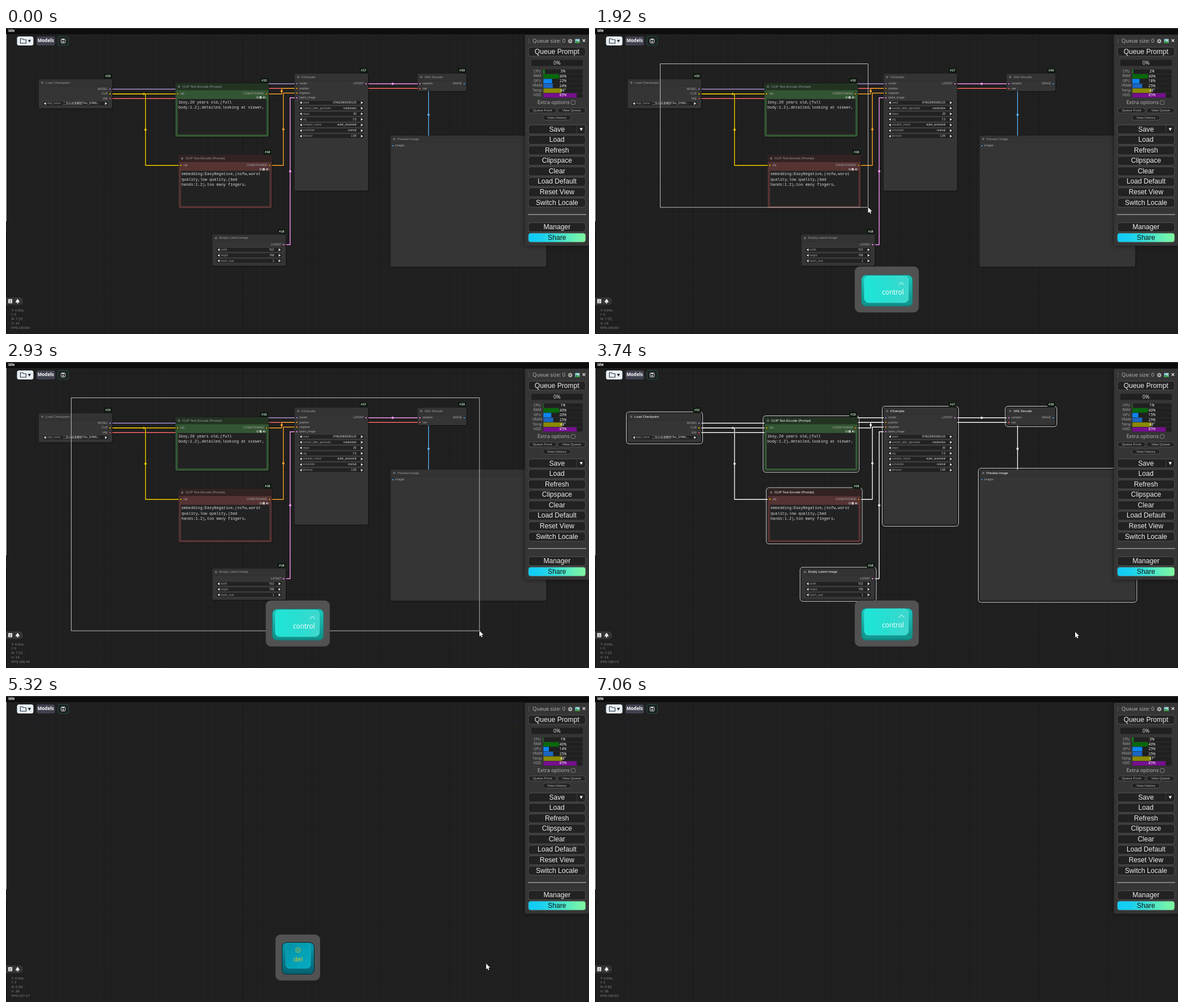
Animation, 1032 px wide and 543 px high, one loop 7.17 s. Source, as an HTML page with a canvas:

```html
<!DOCTYPE html>
<html lang="en">
<head>
<meta charset="utf-8">
<title>Node editor: select all and delete</title>
<style>
html, body { margin: 0; width: 100%; height: 100%; overflow: hidden; background: #202020; }
canvas { display: block; width: 1032px; height: 543px; }
</style>
</head>
<body>
<canvas id="stage"></canvas>
<script>
const W = 1032, H = 543, LOOP = 7170;
const canvas = document.getElementById('stage');
const ratio = window.devicePixelRatio || 1;
canvas.width = W * ratio;
canvas.height = H * ratio;
const c = canvas.getContext('2d');

const ARIAL = '"Liberation Sans", "Noto Sans CJK SC", sans-serif';
const HUMAN = '"Open Sans", "Noto Sans", sans-serif';
const MONO = '"Liberation Mono", monospace';
const COLOR = { model: '#b39ddb', clip: '#ffd500', vae: '#ff6e6e', cond: '#ffa931', latent: '#ff9cf9', image: '#64b5f6' };

const SELECTED_AT = 3200, DELETED_AT = 5150;
// time, x, y
const CURSOR = [
  [50, 600, -14], [200, 520, 8], [400, 300, 40], [600, 140, 60], [700, 115, 63], [1120, 115, 63],
  [1450, 250, 168], [1920, 483, 318], [2400, 674, 413], [2930, 838, 477], [3120, 850, 479],
  [3760, 850, 479], [4000, 850, 475], [6150, 850, 475], [6300, 838, 380], [6500, 790, 130],
  [6680, 748, 8], [6800, 736, 2], [7060, 717, -11]
];
// time, CPU, GPU, VRAM, temperature, FPS
const STATS = [
  [0, 3, 22, 24, 46, '163.93'], [500, 2, 64, 24, 47, '166.67'], [1000, 2, 69, 25, 48, '161.29'],
  [1440, 2, 18, 25, 48, '163.93'], [2330, 1, 20, 25, 48, '169.49'], [3200, 1, 15, 25, 48, '158.73'],
  [4250, 1, 7, 25, 48, '172.41'], [5230, 1, 14, 25, 48, '227.27'], [6080, 2, 10, 25, 47, '163.93'],
  [6820, 3, 25, 25, 47, '163.93']
];

const NODES = [
  { title: 'Load Checkpoint', box: [58, 91, 188, 142.5], id: ['#10', 180.5, 85.5],
    out: [['MODEL', 'model', 108.5], ['CLIP', 'clip', 117], ['VAE', 'vae', 125.2]],
    widgets: [['ckpt_name', '二次元动漫模型\\Ton_SHMIL...', 134, 10]] },
  { title: 'CLIP Text Encode (Prompt)', box: [300, 98, 465, 193], id: ['#15', 457, 93], tint: ['#223322', '#335533'],
    ins: [['clip', 'clip', 117]], out: [['CONDITIONING', 'cond', 117]],
    prompt: ['1boy,20 years old,(full', 'body:1.2),detailed,looking at viewer,'] },
  { title: 'CLIP Text Encode (Prompt)', box: [305.7, 225.5, 470.5, 320], id: ['#16', 463, 220.5], tint: ['#332222', '#553333'],
    ins: [['clip', 'clip', 243.8]], out: [['CONDITIONING', 'cond', 243.8]],
    prompt: ['embedding:EasyNegative,(nsfw,worst', 'quality,low quality,(bad', 'hands:1.2),too many fingers,'] },
  { title: 'KSampler', box: [511, 81, 641, 288.7], id: ['#17', 633, 75.5],
    ins: [['model', 'model', 99], ['positive', 'cond', 107.2], ['negative', 'cond', 115.5], ['latent_image', 'latent', 123.8]],
    out: [['LATENT', 'latent', 99]],
    widgets: [['seed', '878625805095125', 132.5], ['control_after_generate', 'randomize', 142.4], ['steps', '30', 152.3],
      ['cfg', '7.0', 162.2], ['sampler_name', 'euler_ancestral', 172.1], ['scheduler', 'normal', 182], ['denoise', '1.00', 191.9]] },
  { title: 'VAE Decode', box: [728.7, 81, 815, 112], id: ['#19', 807.5, 75.5],
    ins: [['samples', 'latent', 99], ['vae', 'vae', 107.3]], out: [['IMAGE', 'image', 99]] },
  { title: 'Preview Image', box: [681, 191, 956.5, 423.7], ins: [['images', 'image', 209]] },
  { title: 'Empty Latent Image', box: [365.5, 366.7, 495.3, 422], id: ['#18', 488, 361],
    out: [['LATENT', 'latent', 384.5]],
    widgets: [['width', '512', 393.5], ['height', '768', 403.4], ['batch_size', '1', 413.2]] }
];
// kind, start, bend x, end
const LINKS = [
  ['model', 184, 108.5, 350, 515, 99], ['vae', 184, 125.2, 458, 732, 107.3],
  ['clip', 184, 117, 244, 304, 117], ['clip', 184, 117, 247, 309, 243.8],
  ['cond', 461, 117, 488, 515, 107.2], ['cond', 466, 243.8, 491, 515, 115.5],
  ['latent', 491, 384.5, 503, 515, 123.8], ['latent', 637, 99, 684.5, 732, 99],
  ['image', 811, 99, 748, 685, 209]
];

function text(s, x, y, size, color, align = 'left', font = ARIAL, weight = '') {
  c.font = `${weight} ${size}px ${font}`;
  c.textAlign = align;
  c.textBaseline = 'middle';
  c.fillStyle = color;
  c.fillText(s, x, y);
}
function rect(x1, y1, x2, y2, r, fill, stroke, width = 1) {
  c.beginPath();
  c.roundRect(x1, y1, x2 - x1, y2 - y1, r);
  if (fill) { c.fillStyle = fill; c.fill(); }
  if (stroke) { c.strokeStyle = stroke; c.lineWidth = width; c.stroke(); }
}
function dot(x, y, r, fill, stroke) {
  c.beginPath();
  c.arc(x, y, r, 0, 7);
  if (fill) { c.fillStyle = fill; c.fill(); }
  if (stroke) { c.strokeStyle = stroke; c.lineWidth = 0.8; c.stroke(); }
}
function trace(points, closed) {
  c.beginPath();
  for (let i = 0; i < points.length; i += 2) c.lineTo(points[i], points[i + 1]);
  if (closed) c.closePath();
}
function line(points, color, width) {
  trace(points);
  c.strokeStyle = color;
  c.lineWidth = width;
  c.stroke();
}
function poly(points, color) {
  trace(points, true);
  c.fillStyle = color;
  c.fill();
}
function gradient(x1, y1, x2, y2, ...colors) {
  const g = c.createLinearGradient(x1, y1, x2, y2);
  colors.forEach((color, i) => g.addColorStop(i / (colors.length - 1), color));
  return g;
}
const clamp = v => Math.max(0, Math.min(1, v));
const ramp = (t, start, end) => { const p = clamp((t - start) / (end - start)); return p * p * (3 - 2 * p); };
const stepAt = t => STATS.findLast(row => row[0] <= t);

function cursorAt(t) {
  const i = CURSOR.findIndex(k => k[0] > t);
  if (i === 0) return [0, -50];
  if (i < 0) return CURSOR[CURSOR.length - 1].slice(1);
  const a = CURSOR[i - 1], b = CURSOR[i], p = (t - a[0]) / (b[0] - a[0]);
  return [a[1] + (b[1] - a[1]) * p, a[2] + (b[2] - a[2]) * p];
}

function drawBackground() {
  c.fillStyle = '#202020';
  c.fillRect(0, 0, W, H);
  const grid = (gap, color) => {
    c.fillStyle = color;
    for (let x = 51 % gap; x < W; x += gap) c.fillRect(x, 11, 0.6, H);
    for (let y = 43.5 % gap; y < H; y += gap) c.fillRect(0, y, W, 0.6);
  };
  grid(12.25, 'rgba(0,0,0,.12)');
  grid(122.5, 'rgba(0,0,0,.14)');
  line([51, H, 51, 43.5, W, 43.5], 'rgba(34,44,85,.45)', 0.8);
}

function drawLink([kind, x1, y1, bend, x2, y2], selected) {
  const points = [x1, y1, bend, y1, bend, y2, x2, y2];
  const color = selected ? '#fff' : COLOR[kind];
  line(points, 'rgba(0,0,0,.45)', 2.8);
  line(points, color, 1.4);
  dot(bend, (y1 + y2) / 2, 2, color);
}

function drawWidget(x1, x2, [label, value, y, inset = 0]) {
  rect(x1, y - 4.1, x2, y + 4.1, 4, '#222', '#555', 0.45);
  poly([x1 + 6.5, y - 2.4, x1 + 2.6, y, x1 + 6.5, y + 2.4], '#ddd');
  poly([x2 - 6.5, y - 2.4, x2 - 2.6, y, x2 - 6.5, y + 2.4], '#ddd');
  text(label, x1 + 8.3, y, 4.95, '#999');
  text(value, x2 - 14.5 - inset * 0.1, y, 4.95, '#ddd', 'right');
}

function drawPrompt({ box: [x1, y1, x2, y2], prompt }) {
  rect(x1 + 4, y1 + 28, x2 - 4, y2 - 4, 0, '#222');
  prompt.forEach((s, i) => text(s, x1 + 5, y1 + 34 + i * 9.5, 6.87, '#ddd', 'left', MONO));
  const y = y1 + 25.2;
  dot(x2 - 19.7, y, 1.6, null, '#ccc');
  rect(x2 - 16.3, y - 2, x2 - 12.3, y + 2, 0.6, '#ddd');
  line([x2 - 15.4, y, x2 - 14.5, y + 1, x2 - 13, y - 1], '#333', 0.6);
  poly([x2 - 10, y - 0.8, x2 - 7.5, y - 2, x2 - 7.5, y + 2, x2 - 10, y + 0.8], '#ccc');
  line([x2 - 6.3, y - 1.5, x2 - 5.4, y, x2 - 6.3, y + 1.5], '#ccc', 0.6);
}

function drawNode(node, selected) {
  const [x1, y1, x2, y2] = node.box;
  const [head, body] = node.tint || ['#333333', '#353535'];
  c.save();
  c.shadowColor = 'rgba(0,0,0,.5)';
  c.shadowBlur = 2;
  c.shadowOffsetX = c.shadowOffsetY = 1;
  rect(x1, y1, x2, y2, 3, body);
  c.restore();
  rect(x1, y1, x2, y1 + 12.3, [3, 3, 0, 0], head);
  c.fillStyle = 'rgba(0,0,0,.2)';
  c.fillRect(x1, y1 + 12, x2 - x1, 0.5);
  if (selected) rect(x1 - 2.5, y1 - 2.5, x2 + 2.5, y2 + 2.7, 5, null, '#e0e0e0', 0.9);
  dot(x1 + 6.2, y1 + 6.1, 2.1, '#666');
  text(node.title, x1 + 12, y1 + 6, 5.75, selected ? '#fff' : '#999');
  for (const [label, kind, y] of node.ins || []) {
    dot(x1 + 3.9, y, 1.7, COLOR[kind], '#111');
    text(label, x1 + 8.2, y, 5, '#aaa');
  }
  for (const [label, kind, y] of node.out || []) {
    dot(x2 - 3.9, y, 1.7, COLOR[kind], '#111');
    text(label, x2 - 7.8, y, 5, '#aaa', 'right');
  }
  for (const w of node.widgets || []) drawWidget(x1 + 6.2, x2 - 6.2, w);
  if (node.prompt) drawPrompt(node);
  if (node.id) {
    const [label, x, y] = node.id;
    rect(x - 7, y - 4.2, x + 7, y + 4.2, 2, '#0b1a0d');
    text(label, x, y, 5.6, '#ddd', 'center', ARIAL, 'bold');
  }
}

function drawChrome(fps, count) {
  rect(0, 0, W, 11, 0, '#0d0d0d');
  line([0, 0.5, W, 0.5], '#444', 1);
  text('Idle', 4, 5.5, 6.2, '#fff', 'left', HUMAN, 'bold');
  rect(0, 11, 0.9, 343, 0, '#ddd');
  rect(0, 363, 0.9, H, 0, '#0c0c0c');

  rect(19.5, 15, 48.5, 31, 3.5, '#e8f0f6');
  c.lineJoin = 'round';
  trace([25.5, 19, 29.5, 19, 31, 20.7, 35.5, 20.7, 35.5, 27, 25.5, 27], true);
  c.strokeStyle = '#24303c';
  c.lineWidth = 1.1;
  c.stroke();
  poly([38.8, 21, 44.2, 21, 41.5, 25.7], '#222');
  rect(54, 15, 86.7, 31, 3.5, '#41424f');
  text('Models', 70.2, 23.2, 8.1, '#fff', 'center', HUMAN, 'bold');
  rect(92, 15, 110.7, 30.8, 3, '#1b2121', '#2b6059', 0.8);
  rect(97.5, 19.5, 104.8, 26.7, 1, null, '#eee', 1);
  rect(99.4, 19.5, 102.8, 21.5, 0, '#eee');
  dot(101.1, 24.2, 1.2, '#eee');

  rect(0, 478, 30, 491.5, [0, 6, 6, 0], '#353535');
  rect(4, 481, 11, 488.5, 1, '#eee');
  for (const y of [483, 485, 487]) line([5.5, y, 9.5, y], '#444', 0.7);
  poly([20.5, 480.5, 23, 484, 24.2, 486.7, 16.8, 486.7, 18, 484], '#eee');
  rect(19.6, 486, 21.4, 489, 0, '#eee');

  const info = ['T: 0.00s', 'I: 0', count ? 'N: 7 [7]' : 'N: 0 [0]', count ? 'V: 14' : 'V: 38', 'FPS:' + fps];
  info.forEach((s, i) => text(s, 9.5, 501 + i * 7.8, 6.15, '#888'));
}

function button(label, y, x1 = 924.7, x2 = 1026, h = 16, size = 12.15, color = '#eee') {
  rect(x1, y - h / 2, x2, y + h / 2, 4, '#222', '#525252', 1);
  text(label, (x1 + x2) / 2, y + 0.2, size, color, 'center');
}

function drawPanel([, cpu, gpu, vram, temp]) {
  c.save();
  c.shadowColor = 'rgba(0,0,0,.55)';
  c.shadowBlur = 8;
  rect(918.5, 12, W + 4, 386.5, 3, '#353535');
  c.restore();
  for (const y of [20, 23, 26]) dot(925.7, y, 0.6, '#aaa');
  text('Queue size: 0', 932, 23.6, 9.3, '#bbb', 'left', HUMAN);
  for (let i = 0; i < 4; i++) {
    const dx = Math.cos(i * Math.PI / 4) * 4, dy = Math.sin(i * Math.PI / 4) * 4;
    line([998.8 - dx, 23.3 - dy, 998.8 + dx, 23.3 + dy], '#bbb', 1.5);
  }
  dot(998.8, 23.3, 2.8, '#bbb');
  dot(998.8, 23.3, 1.3, '#353535');
  rect(1007.5, 19.5, 1015.5, 27, 0.5, '#8fd4f0');
  poly([1007.5, 27, 1007.5, 24.5, 1010, 22.5, 1013, 24.5, 1015.5, 23.5, 1015.5, 27], '#3f9a45');
  dot(1013.5, 21.5, 1, '#f5d44a');
  line([1020.7, 20, 1025.3, 24.6], '#eee', 1.1);
  line([1025.3, 20, 1020.7, 24.6], '#eee', 1.1);

  button('Queue Prompt', 42);
  rect(930, 56.5, 1021, 67.3, 0, '#202020');
  text('0%', 975.3, 62.2, 9.2, '#eee', 'center', HUMAN);
  const bars = [['CPU', cpu, '#0aa015'], ['RAM', 40, '#07690b'], ['GPU', gpu, '#0c86f4'],
    ['VRAM', vram, '#1b66c2'], ['Temp', temp, '#8a8a00'], ['HDD', 85, '#760f8e']];
  bars.forEach(([label, value, color], i) => {
    const y = 77.4 + i * 8.43;
    rect(951.3, y - 3.9, 1020.7, y + 3.9, 0, '#202020');
    rect(951.3, y - 3.9, 951.3 + 69.4 * value / 100, y + 3.9, 0, color);
    text(label, 940.5, y, 6.3, '#aaa', 'center', HUMAN);
    text(value + (label === 'Temp' ? '°' : '%'), 986, y + 0.2, 6.3, '#fff', 'center', HUMAN);
  });
  text('Extra options', 940.7, 133, 9.3, '#bbb', 'left', HUMAN);
  rect(1000.7, 128.8, 1007.5, 135.6, 1.3, '#333', '#999', 0.8);
  button('Queue Front', 146.3, 925, 974.3, 9, 6.07, '#bbb');
  button('View Queue', 146.3, 976.5, 1025.7, 9, 6.07, '#bbb');
  button('View History', 159, 950.3, 1000, 9, 6.07, '#bbb');
  ['Save', 'Load', 'Refresh', 'Clipspace', 'Clear', 'Load Default', 'Reset View', 'Switch Locale']
    .forEach((label, i) => button(label, 180 + i * 18.58));
  line([1010.5, 172, 1010.5, 188], '#444', 0.8);
  poly([1015.5, 177.5, 1021, 177.5, 1018.2, 182.8], '#eee');
  line([924, 331, 1027, 331], '#ccc', 1);
  button('Manager', 353.4);
  rect(924.7, 364, 1026, 380, 4, gradient(925, 0, 1026, 0, '#0fcbf7', '#17cff2', '#2cdae0', '#4ae5cb', '#68f0b5', '#80f79f'), '#58675f', 0.8);
  text('Share', 975.3, 372.2, 12.15, '#111', 'center');
}

// Key cap card that flips open and shut around its vertical axis.
function drawKey(mid, half, open, drawCap) {
  if (open <= 0) return;
  c.save();
  c.translate(mid, 0);
  c.scale(open, 1);
  c.translate(-mid, 0);
  rect(mid - half, 423.3, mid + half, 504.7, 9, '#525252');
  drawCap();
  c.restore();
}
function controlCap(press) {
  const d = press * 2.5;
  rect(471.7, 437.3 + d * 0.5, 562, 493.7, 8, gradient(0, 438, 0, 494, '#1cc9bd', '#17aaa2', '#0f8982'), '#0d7f79', 0.8);
  poly([477, 484 + d, 555, 484 + d, 561, 490, 475, 490], '#129a93');
  rect(477, 438 + d, 554.7, 484.5 + d, 7, gradient(477, 0, 555, 0, '#1de6d8', '#28ded1', '#3fd7cd'), '#4df0e4', 0.7);
  line([537.8, 453.3 + d, 542.5, 448.8 + d, 547.2, 453.3 + d], '#fff', 1);
  text('control', 546.8, 467.6 + d, 11.8, '#fff', 'right', HUMAN);
}
function delCap(press) {
  const d = press * 2.5;
  rect(488.7, 437.3 + d * 0.5, 545.6, 493.7, 8, gradient(0, 438, 0, 494, '#0897ab', '#077b8c', '#066171'), '#08323a', 1.2);
  rect(495, 439 + d, 539.3, 483.3 + d, 7, gradient(495, 439, 539, 483, '#0590a6', '#03a0b6', '#0aabc0'), '#16b4c8', 0.6);
  dot(517, 450.8 + d, 4.1, null, '#f0c81e');
  line([515.4, 449.2 + d, 518.6, 452.4 + d], '#f0c81e', 0.9);
  line([518.6, 449.2 + d, 515.4, 452.4 + d], '#f0c81e', 0.9);
  text('del', 517, 467.8 + d, 11.6, '#f0c81e', 'center', HUMAN);
}

function drawCursor(x, y) {
  c.save();
  c.translate(x, y);
  trace([0, 0, 0, 10, 2.3, 7.9, 3.9, 11.4, 5.4, 10.7, 3.9, 7.3, 7, 7], true);
  c.strokeStyle = '#111';
  c.lineWidth = 1;
  c.stroke();
  c.fillStyle = '#fff';
  c.fill();
  c.restore();
}

function draw(t) {
  const stats = stepAt(t), [x, y] = cursorAt(t);
  const present = t < DELETED_AT, selected = t >= SELECTED_AT;
  c.setTransform(ratio, 0, 0, ratio, 0, 0);
  drawBackground();
  if (present) {
    LINKS.forEach(link => drawLink(link, selected));
    NODES.forEach(node => drawNode(node, selected));
  }
  if (t > 1120 && !selected) rect(115.5, 63.5, x, y, 0, null, '#ccc', 0.9);
  drawChrome(stats[5], present);
  drawPanel(stats);
  drawKey(516.5, 56.7, ramp(t, 780, 1000) - ramp(t, 3900, 4200),
    () => controlCap(ramp(t, 1000, 1100) - ramp(t, 3300, 3450)));
  drawKey(516.5, 39.5, ramp(t, 4874, 5110) - ramp(t, 6100, 6380),
    () => delCap(ramp(t, 5090, 5150) - ramp(t, 5220, 5310)));
  drawCursor(x, y);
}

function tick() {
  draw(performance.now() % LOOP);
  requestAnimationFrame(tick);
}
tick();
</script>
</body>
</html>
```
